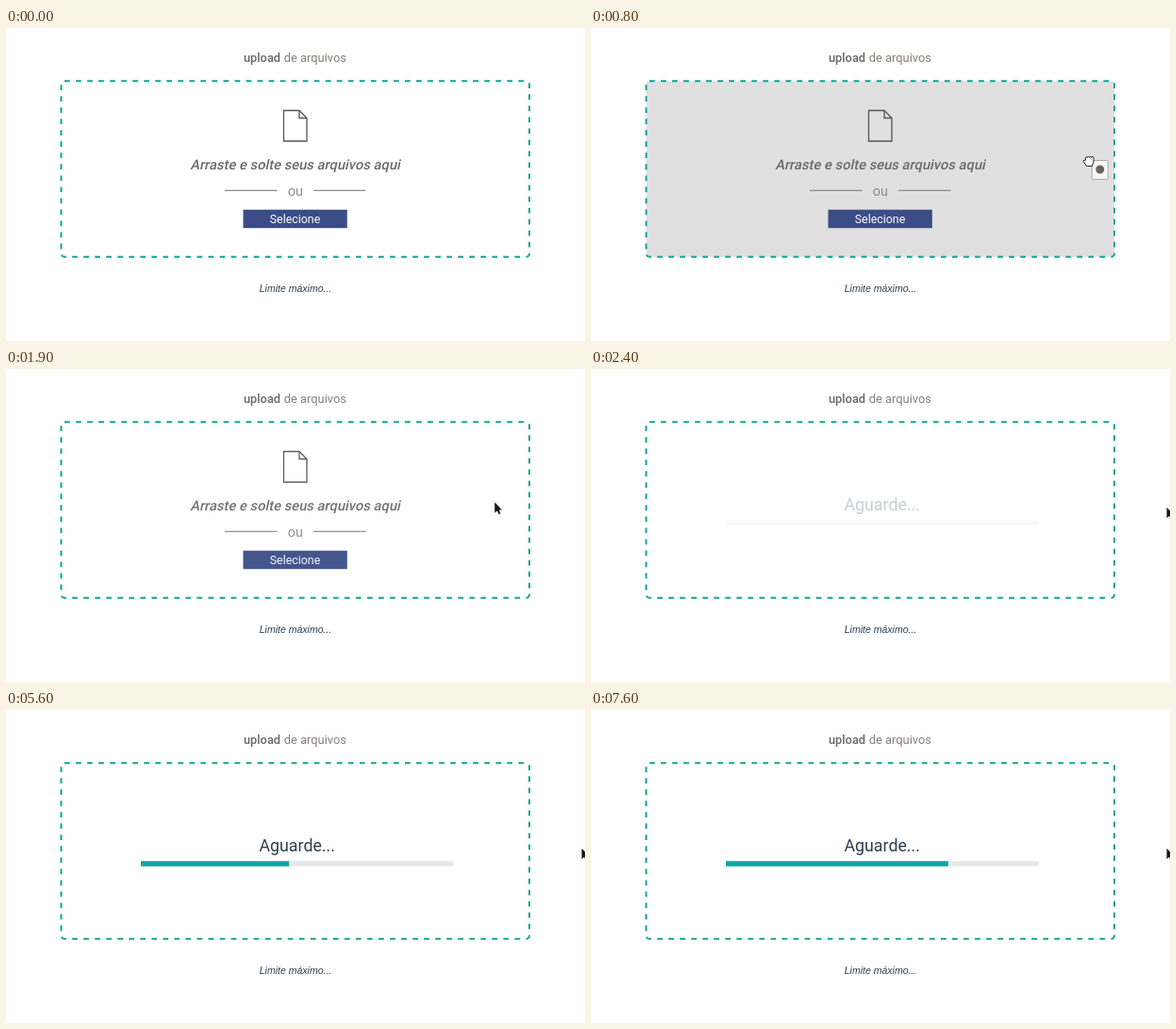
These frames come from a looping animation (614 px wide and 332 px high, 8000 ms). An HTML page with a canvas:

```html
<!DOCTYPE html>
<html lang="pt">
<head>
<meta charset="utf-8">
<title>Upload de arquivos</title>
<style>
html, body { margin: 0; width: 100%; height: 100%; overflow: hidden; background: #fff; }
canvas { display: block; width: 614px; height: 332px; }
</style>
</head>
<body>
<canvas id="stage" width="614" height="332"></canvas>
<script>
const ctx = document.getElementById('stage').getContext('2d');
const LOOP = 8000;
const STEP = 100;
const TEAL = '#11a396';
const NAVY = '#2c3e50';
const GREY = '#8c8c8c';

// Progress of t from a to b, held within 0 and 1.
const ramp = (t, a, b) => Math.min(1, Math.max(0, (t - a) / (b - a)));
const smooth = p => p * p * (3 - 2 * p);
const mix = (a, b, p) => a + (b - a) * p;

function text(str, x, y, font, color, align = 'center') {
  ctx.font = font;
  ctx.fillStyle = color;
  ctx.textAlign = align;
  ctx.fillText(str, x, y);
}

function line(points, color, width, close) {
  ctx.beginPath();
  for (const [x, y] of points) ctx.lineTo(x, y);
  if (close) ctx.closePath();
  ctx.strokeStyle = color;
  ctx.lineWidth = width;
  ctx.stroke();
}

function roundBox(x, y, w, h, r, fill) {
  ctx.beginPath();
  ctx.roundRect(x, y, w, h, r);
  ctx.fillStyle = fill;
  ctx.fill();
}

function moved(x, y, draw) {
  ctx.save();
  ctx.translate(x, y);
  draw();
  ctx.restore();
}

function faded(alpha, draw) {
  ctx.save();
  ctx.globalAlpha = alpha;
  draw();
  ctx.restore();
}

function dropZone(hover) {
  const w = 496.5, h = 186.4, r = 3.5;
  roundBox(58.5, 56.3, w, h, r, hover ? '#e0e0e0' : '#fff');
  const length = 2 * (w + h) - (8 - 2 * Math.PI) * r;
  const period = length / Math.round(length / 12);
  ctx.setLineDash([period * 0.48, period * 0.52]);
  ctx.strokeStyle = TEAL;
  ctx.lineWidth = 2;
  ctx.stroke();
  ctx.setLineDash([]);
}

function form() {
  line([[294.5, 87.5], [311, 87.5], [319, 95.5], [319, 120], [294.5, 120]], '#555', 1.3, true);
  line([[311, 87.5], [311, 95.5], [319, 95.5]], '#555', 1.3);

  // Slanted upright letters rather than a true italic.
  moved(306.5, 150, () => {
    ctx.transform(1, 0, -0.22, 1, 0, 0);
    text('Arraste e solte seus arquivos aqui', 0, 0, '500 14.7px Roboto, sans-serif', '#6a6a6a');
  });

  for (const x of [232, 326]) line([[x, 172.4], [x + 55.5, 172.4]], GREY, 1.3);
  text('ou', 306.8, 178, '14.4px Roboto, sans-serif', GREY);
  ctx.fillStyle = '#3b4d87';
  ctx.fillRect(251.5, 192.7, 110.3, 19.5);
  text('Selecione', 306.5, 206.5, '12.4px Roboto, sans-serif', '#fff');
}

function waiting(width) {
  text('Aguarde...', 308.7, 150.2, '17.8px Roboto, sans-serif', NAVY);
  roundBox(143, 160.3, 331.7, 5.5, [0, 2.7, 2.7, 0], '#e6e6e6');
  ctx.fillStyle = '#11a59f';
  ctx.fillRect(143, 160.3, width, 5.5);
}

function draggedFile() {
  roundBox(530.5, 140.5, 17, 20, 1.5, '#f6f6f6');
  ctx.strokeStyle = '#aaa';
  ctx.lineWidth = 1;
  ctx.stroke();
  ctx.beginPath();
  ctx.arc(539, 150, 4.5, 0, 7);
  ctx.fillStyle = '#6b655c';
  ctx.fill();

  // Closed hand: four knuckles over a palm.
  ctx.beginPath();
  ctx.moveTo(523.5, 140.5);
  for (let i = 0; i < 4; i++) {
    const x = 523.5 + i * 2.2;
    ctx.quadraticCurveTo(x + 0.5, 134.5, x + 2.2, 137.5);
  }
  ctx.lineTo(532.2, 142);
  ctx.lineTo(530.5, 146.5);
  ctx.lineTo(525, 146.5);
  ctx.lineTo(521.3, 141.5);
  ctx.quadraticCurveTo(521, 139.5, 523.5, 140.5);
  ctx.fillStyle = '#fff';
  ctx.fill();
  ctx.strokeStyle = '#222';
  ctx.stroke();
}

function arrow() {
  const shape = [[0, 0], [0, 11], [2.5, 8.7], [4.3, 12.6], [6, 11.8], [4.3, 8], [7.6, 8]];
  ctx.lineJoin = 'round';
  line(shape, '#e4e4e4', 1.6, true);
  ctx.fillStyle = '#151515';
  ctx.fill();
}

function pointer(t) {
  if (t < 600) return;
  if (t < 1200) {
    const p = ramp(t, 600, 1000);
    moved(70 * (1 - p) ** 3 - 8, 8 * (p - 0.5) ** 2, draggedFile);
  } else {
    const p = smooth(ramp(t, 1900, 2200));
    moved(mix(518.3, 610.6, p), mix(141.5, 147, p), arrow);
  }
}

function render(t) {
  ctx.fillStyle = '#fff';
  ctx.fillRect(0, 0, 614, 332);

  text('upload', 252, 35.5, '500 12.8px Roboto, sans-serif', '#666', 'left');
  text('de arquivos', 361, 35.5, '12.9px Roboto, sans-serif', '#857f78', 'right');
  text('Limite máximo...', 307, 280.3, 'italic 10.5px "Liberation Sans", sans-serif', NAVY);

  dropZone(t >= 700 && t < 1900);
  faded(1 - smooth(ramp(t, 1850, 2200)), form);

  const ticks = Math.max(0, Math.floor((t - 1600) / 1000));
  faded(smooth(ramp(t, 2300, 2600)), () => waiting(39.3 * ticks));

  pointer(t);
}

const begin = performance.now();
function tick() {
  const t = (performance.now() - begin) % LOOP;
  render(Math.floor(t / STEP) * STEP);
  requestAnimationFrame(tick);
}
tick();
</script>
</body>
</html>
```
